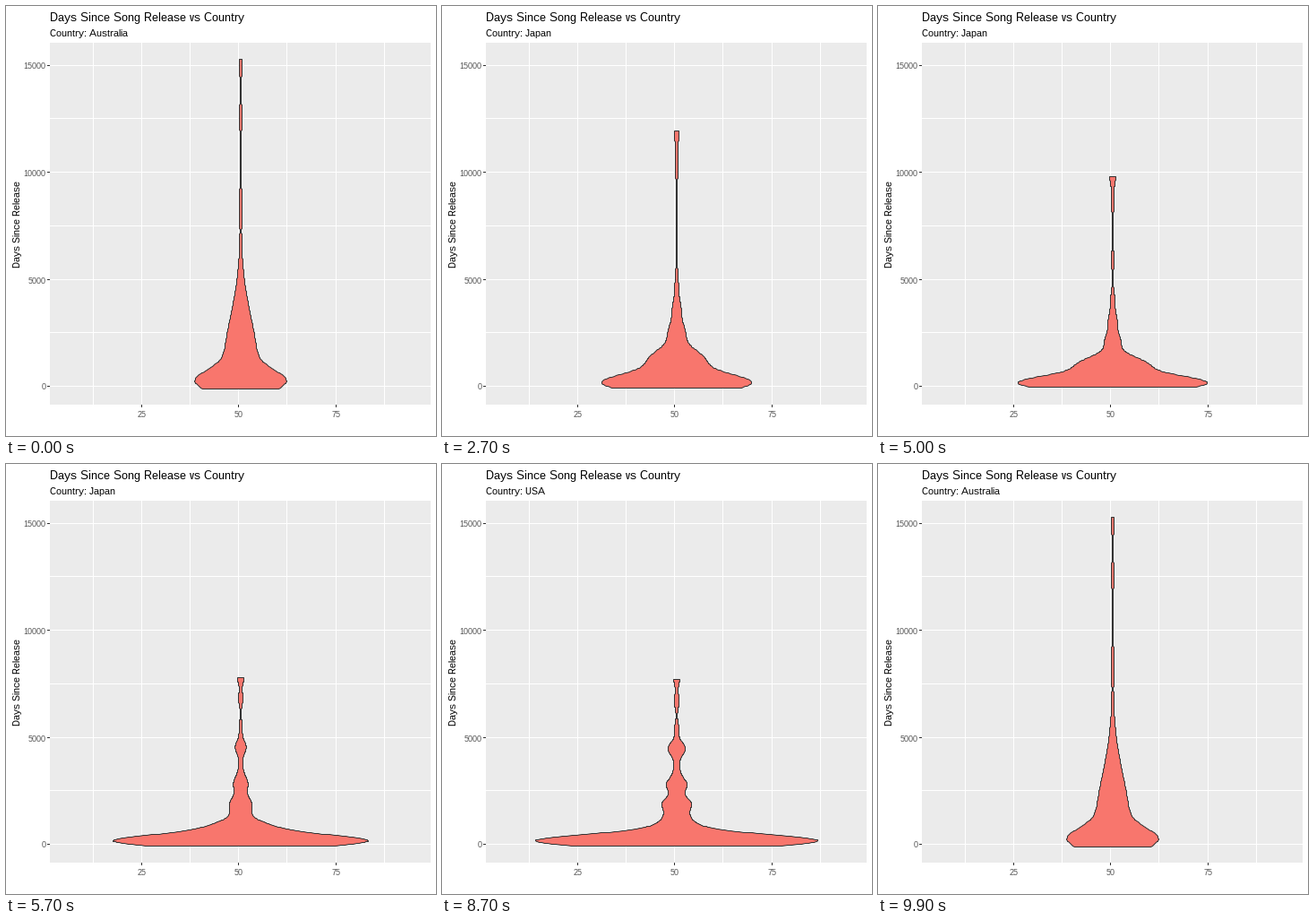
A matplotlib script for the animation above (10 s loop, 480 px wide and 480 px high).

```python
import numpy as np
import matplotlib.pyplot as plt
from matplotlib.animation import FuncAnimation
from matplotlib.patches import Polygon, Rectangle

# Grid-fitted glyphs
plt.rcParams["text.hinting"] = "native"
plt.rcParams["text.hinting_factor"] = 1

SIZE, DPI = 480, 100
PX = 72 / DPI  # points per pixel
FRAMES, INTERVAL = 100, 100
CENTER = 261.5
STEPS = np.linspace(0, 1, 400)


def density(bottom, top, band, bumps):
    """Half widths and rows of a violin built from Gaussian bumps.

    A bump is (height above the bottom, half width, optional spread)."""
    h = (bottom - top) * STEPS
    w = np.full_like(h, 0.4)
    for at, amp, *spread in bumps:
        sd = band * (spread[0] if spread else 1)
        w += amp * np.exp(-((h - at) / sd) ** 2 / 2)
    return np.column_stack((w, bottom - h))


STATES = [
    ("Australia", density(427, 59, 12, [
        (8.5, 33.2), (26, 18.4, 4.5), (207, 0.9, 1.5), (303, 1.3),
        (364, 1.4)])),
    ("Japan", density(425.2, 182.7, 8.8, [
        (4.5, 99.5), (27, 36), (52, 8), (75, 4.3), (100, 1.7), (160, 0.4),
        (213, 1.3), (241, 2.8)])),
    ("USA", density(426.3, 300, 4.7, [
        (4.3, 191), (14, 20), (22.5, 10), (32.5, 17.5), (46.5, 13.8),
        (56, 3), (64, 2), (74, 12), (88.5, 2.8), (110.5, 3.1),
        (126.5, 3.5)])),
]
# (last frame at rest, first frame at the next state)
MOVES = [(16, 33), (49, 66), (83, 99)]


def state_at(frame):
    for i, (start, end) in enumerate(MOVES):
        if frame <= end:
            t = max(0, (frame - start) / (end - start))
            break
    (name, a), (next_name, b) = STATES[i], STATES[(i + 1) % 3]
    return (next_name if t > 0.5 else name), a + (b - a) * t


def outline(half):
    """Closed outline with its points on whole pixels."""
    w, y = half.T
    left = np.column_stack((CENTER - w, y))
    right = np.column_stack((CENTER + w, y))[::-1]
    return np.floor(np.vstack((left, right)) + 0.5)


fig = plt.figure(figsize=(SIZE / DPI, SIZE / DPI), dpi=DPI, facecolor="white")
ax = fig.add_axes([0, 0, 1, 1])
ax.set_xlim(-0.5, SIZE - 0.5)
ax.set_ylim(SIZE - 0.5, -0.5)
ax.axis("off")


def box(x, y, w, h, color):
    ax.add_patch(Rectangle((x - 0.5, y - 0.5), w, h, fc=color, lw=0,
                           antialiased=False))


def label(x, y, text, size, color="black", **kw):
    return ax.text(x, y, text, fontsize=size * PX, color=color,
                   family="Liberation Sans", va="baseline", **kw)


box(49, 41, 425, 404, "#EBEBEB")
for i in range(7):
    x, y = int(97 + 54.2 * i), int(424.6 - 59.75 * i)
    box(x, 41, 1, 404, "white")
    box(49, y, 425, 1, "white")
    if i % 2:
        box(x, 445, 1, 3, "#333333")
        label(x, 458.5, f"{12.5 * (i + 1):.0f}", 9, "#4D4D4D", ha="center")
    else:
        box(46, y, 3, 1, "#333333")
        label(44, y + 4, str(2500 * i), 9, "#4D4D4D", ha="right")

label(48.5, 16.5, "Days Since Song Release vs Country", 13)
subtitle = label(48.5, 33.5, "", 11)
label(15.5, 243.5, "Days Since Release", 11, rotation=90, ha="center",
      rotation_mode="anchor")

violin = Polygon(outline(STATES[0][1]), closed=True, fc="#F8766D",
                 ec="#333333", lw=PX, snap=False)
ax.add_patch(violin)


def draw(frame):
    name, half = state_at(frame)
    violin.set_xy(outline(half))
    subtitle.set_text("Country: " + name)
    return violin, subtitle


anim = FuncAnimation(fig, draw, frames=FRAMES, interval=INTERVAL, repeat=True,
                     repeat_delay=0)
plt.show()
```
